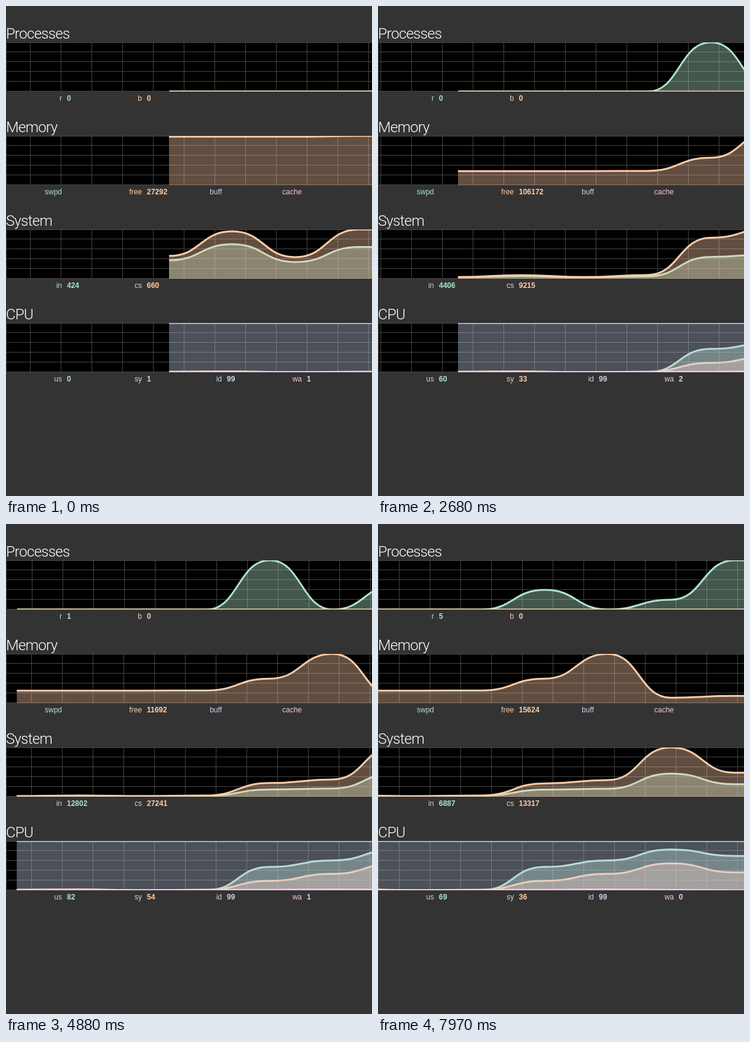
Write an HTML page with a canvas that moves like this. It is 595x796 px and loops after 8 s.

```html
<!DOCTYPE html>
<html lang="en">
<head>
<meta charset="utf-8">
<title>System monitor</title>
<style>
  html, body { margin: 0; width: 100%; height: 100%; overflow: hidden; background: #333; }
  canvas, svg { position: absolute; left: 0; top: 0; width: 595px; height: 796px; }
  text { font: 12px "Liberation Sans", Arial, sans-serif; }
  .title { font: 300 24px Roboto, Inter, sans-serif; letter-spacing: -.7px; fill: #fff; }
  .label { text-anchor: end; }
  .value { font-weight: bold; }
</style>
</head>
<body>
<canvas id="stage" width="595" height="796"></canvas>
<svg id="labels" viewBox="0 0 595 796"></svg>
<script>
const WIDTH = 595, HEIGHT = 80, LOOP = 8000;
const COLORS = ['174,227,201', '255,203,166', '198,209,232', '245,198,227'];

// One sample per point; null series have a label but no data.
const charts = [
  { title: 'Processes', top: 59, shift: .5, series: {
    r: [0, 0, 0, 0, 2, 0, 1, 5],
    b: Array(8).fill(0) } },
  { title: 'Memory', top: 211, shift: 0, series: {
    swpd: null,
    free: [26850, 26850, 26850, 27292, 52700, 106172, 11692, 15624],
    buff: null,
    cache: null } },
  { title: 'System', top: 363, shift: 0, series: {
    in: [247, 462, 223, 424, 3881, 4406, 12802, 6887],
    cs: [305, 635, 289, 660, 7312, 9215, 27241, 13317] } },
  { title: 'CPU', top: 515, shift: 0, series: {
    us: [0, 0, 0, 0, 47, 60, 82, 69],
    sy: [1, 2, 0, 1, 19, 33, 54, 36],
    id: Array(8).fill(99),
    wa: [1, 1, 0, 1, 1, 2, 1, 0] } },
];

const FIRST_KNOWN = 3;
const pointX = i => 265 + 102.7 * i;
const arrival = i => pointX(i) - 653;   // scroll offset at which a sample comes in

// Ticks last 150 ms, a few of them 140 ms; each scrolls by 7.5 px.
const shortTicks = new Set([10, 13, 18, 20, 23, 25, 28, 34, 36, 38, 41, 45, 51]);
const tickStarts = [0];
for (let k = 0; k < 54; k++) tickStarts.push(tickStarts[k] + (shortTicks.has(k) ? 140 : 150));
const tickAt = time => tickStarts.findLastIndex(start => start <= time);

const ctx = document.getElementById('stage').getContext('2d');
const svg = document.getElementById('labels');

function addText(x, y, className, content, color) {
  const node = document.createElementNS('http://www.w3.org/2000/svg', 'text');
  node.setAttribute('x', x);
  node.setAttribute('y', y);
  node.setAttribute('class', className);
  if (color) node.setAttribute('fill', `rgb(${color})`);
  node.textContent = content;
  svg.append(node);
  return node;
}

for (const chart of charts) {
  addText(0, chart.top - 6, 'title', chart.title);
  chart.lines = [];
  Object.entries(chart.series).forEach(([name, values], i) => {
    const x = 91 + 130 * i, y = chart.top + 95, color = COLORS[i];
    addText(x, y, 'label', name, color);
    if (values) chart.lines.push({ values, color, node: addText(x + 8, y, 'value', '', color) });
  });
}

// The vertical scale eases towards the largest sample known so far.
function scaleAt(chart, offset) {
  const peak = i => Math.max(...chart.lines.flatMap(line => line.values.slice(0, i + 1)));
  let scale = peak(FIRST_KNOWN);
  for (let i = FIRST_KNOWN + 1; i < 8 && offset >= arrival(i); i++) {
    const travelled = Math.min(offset, arrival(i + 1)) - arrival(i);
    scale = peak(i) + (scale - peak(i)) * Math.exp(-.16 * travelled);
  }
  return scale || 1;
}

function drawGrid(offset, shift) {
  ctx.fillStyle = '#000';
  ctx.fillRect(0, 0, WIDTH, HEIGHT);
  ctx.fillStyle = '#444';
  for (let i = 0; i <= 5; i++) ctx.fillRect(0, Math.max(0, 16 * i - 1), WIDTH, 1);
  const start = ((39.4 + shift - offset) % 50 + 50) % 50;
  for (let x = start; x < WIDTH; x += 50) ctx.fillRect(Math.floor(x), 0, 1, HEIGHT);
  ctx.fillRect(0, 0, 1, HEIGHT);
}

function drawLine({ values, color }, left, last, scale) {
  const yOf = i => HEIGHT * (1 - values[i] / scale);
  const xOf = i => pointX(i) + left;
  ctx.beginPath();
  ctx.moveTo(xOf(0), yOf(0));
  for (let i = 1; i <= last; i++) {
    const middle = (xOf(i - 1) + xOf(i)) / 2;
    ctx.bezierCurveTo(middle, yOf(i - 1), middle, yOf(i), xOf(i), yOf(i));
  }
  const right = Math.max(WIDTH + 5, xOf(last));
  ctx.lineTo(right, yOf(last));
  ctx.lineWidth = 3;
  ctx.strokeStyle = `rgb(${color})`;
  ctx.stroke();
  ctx.lineTo(right, HEIGHT + 4);
  ctx.lineTo(xOf(0), HEIGHT + 4);
  ctx.closePath();
  ctx.fillStyle = `rgba(${color},.385)`;
  ctx.fill();
}

function render(time) {
  const offset = 7.5 * tickAt(time);
  let last = FIRST_KNOWN;
  while (last < 7 && offset >= arrival(last + 1)) last++;

  ctx.clearRect(0, 0, WIDTH, 796);
  for (const chart of charts) {
    const scale = scaleAt(chart, offset);
    ctx.save();
    ctx.translate(0, chart.top);
    ctx.beginPath();
    ctx.rect(0, 0, WIDTH, HEIGHT);
    ctx.clip();
    drawGrid(offset, chart.shift);
    for (const line of chart.lines) {
      drawLine(line, chart.shift - offset, last, scale);
      line.node.textContent = line.values[last];
    }
    ctx.restore();
  }
}

const began = performance.now();
function loop() {
  render((performance.now() - began) % LOOP);
  requestAnimationFrame(loop);
}
loop();
</script>
</body>
</html>
```
